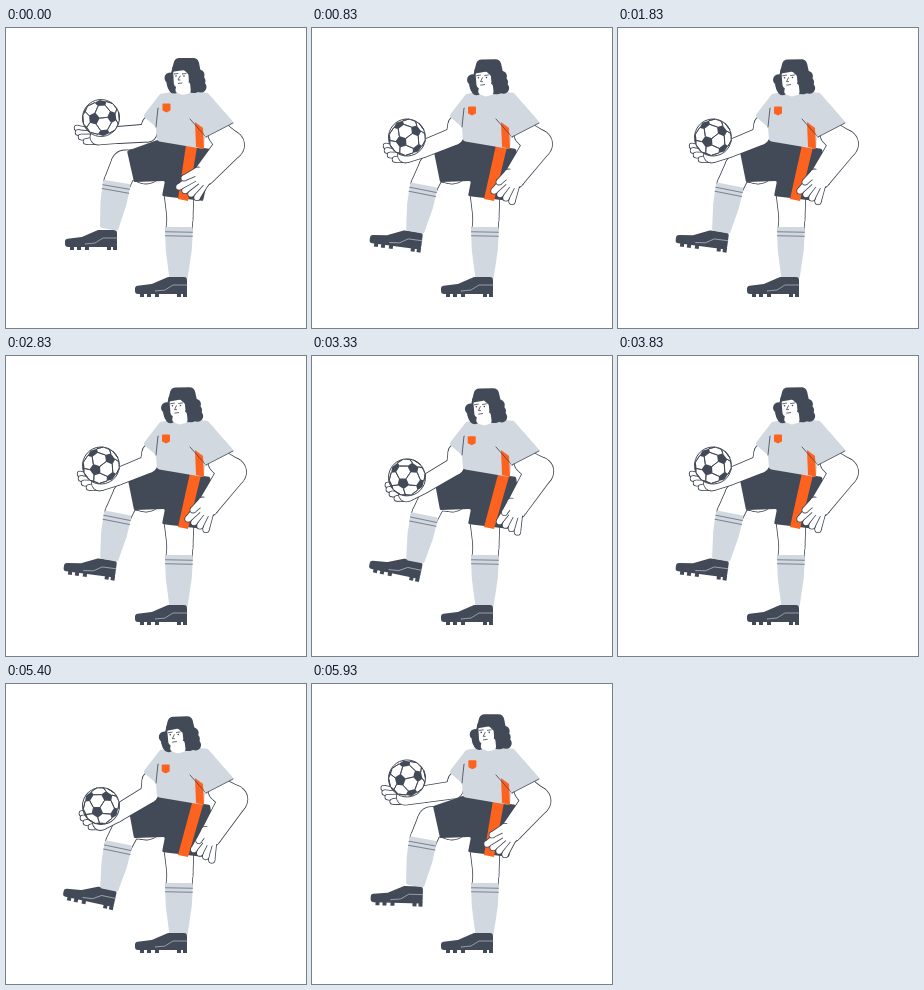
An HTML page with a canvas that plays this animation: 300x300 px, repeating every 6010 ms.

```html
<!DOCTYPE html>
<html lang="en">
<head>
<meta charset="utf-8">
<title>Footballer</title>
<style>
html, body { margin: 0; width: 100%; height: 100%; overflow: hidden; background: #fff; }
canvas { display: block; width: 300px; height: 300px; }
</style>
</head>
<body>
<canvas id="stage" width="300" height="300"></canvas>
<script>
const ctx = document.getElementById('stage').getContext('2d');
const DARK = '#434a57', INK = '#3f4550', SEAM = '#7b8390', GREY = '#d2d8e0', ORANGE = '#fe621f', WHITE = '#fff';
const LOOP = 6010, FRAMES = 120, BEAT = 20;
let sink = 0; // 0 = ball raised, grows as the body sinks

const mix = (a, b) => a + (b - a) * sink;

function disc(x, y, r, fill) {
  ctx.beginPath();
  ctx.arc(x, y, r, 0, 7);
  ctx.fillStyle = fill;
  ctx.fill();
}

function shape(points, fill, radius = 0) {
  const n = points.length, [a, z] = [points[0], points[n - 1]];
  ctx.beginPath();
  ctx.moveTo((a[0] + z[0]) / 2, (a[1] + z[1]) / 2);
  points.forEach((p, i) => ctx.arcTo(...p, ...points[(i + 1) % n], radius));
  ctx.closePath();
  ctx.fillStyle = fill;
  ctx.fill();
}

function line(points, color = INK, width = 0.8) {
  ctx.beginPath();
  points.forEach(p => ctx.lineTo(...p));
  ctx.strokeStyle = color;
  ctx.lineWidth = width;
  ctx.stroke();
}

function placed(x, y, turn, draw) {
  ctx.save();
  ctx.translate(x, y);
  ctx.rotate(turn);
  draw();
  ctx.restore();
}

// Outlined chain of joints [x, y, radius]
function limb(...joints) {
  for (const [grow, fill] of [[0.4, INK], [-0.4, WHITE]]) {
    joints.forEach(([x, y, r], i) => {
      disc(x, y, r + grow, fill);
      if (!i) return;
      const [u, v, s] = joints[i - 1], d = Math.hypot(x - u, y - v);
      const nx = (v - y) / d, ny = (x - u) / d, a = r + grow, b = s + grow;
      shape([[x + nx * a, y + ny * a], [x - nx * a, y - ny * a], [u - nx * b, v - ny * b], [u + nx * b, v + ny * b]], fill);
    });
  }
}

function sock(x, y, length, turn) {
  placed(x, y, turn, () => {
    shape([[-14, 0], [14, 0], [13, length * 0.45], [9, length], [-9, length], [-13, length * 0.45]], GREY, 2);
    for (const drop of [5, 9]) line([[-13.5, drop], [13.5, drop]], SEAM, 1);
  });
}

// Boot with the ankle at the origin, toe to the left
function boot(x, y, turn) {
  placed(x, y, turn, () => {
    for (const stud of [-37, -30, -22, 0, 6]) ctx.fillStyle = DARK, ctx.fillRect(stud, 14, 4, 5);
    shape([[-42, 8], [-25, 6], [-9, -1], [10, -1], [10, 16], [-42, 16]], DARK, 3);
    line([[-22, 13], [-12, 12], [-4, 7], [10, 7]], '#aab2bd');
  });
}

function standingLeg() {
  limb([173, 165, 15], [174, 190, 13], [173, 202, 13]);
  sock(173, 199, 52, 0.01);
  boot(171, 250, 0);
}

function raisedLeg() {
  const x = mix(111, 112), y = mix(155, 158);
  boot(101, mix(203, 204.5), mix(0, 0.13));
  limb([140, 138, 18], [mix(119, 121), mix(136, 139), 14], [x, y, 13.4]);
  sock(x, y - 1, 48, mix(0.17, 0.19));
}

function shorts() {
  shape([[121, mix(123, 119)], [151, 112], [198, 120], [204, 121], [206, 134], [197, 173], [156, 168], [159, 153], [128, 154]], DARK, 1.5);
  const top = mix(180, 184);
  shape([[top, 117], [top + 11, 119], [182, 173], [172, 171]], ORANGE);
}

function ballArm() {
  const dx = mix(0, 3), dy = mix(0, 18);
  for (let i = 0; i < 4; i++) limb([71 + dx + i * i, 100 + dy + 4.5 * i, 2.8], [90 + dx, 105 + dy + 2.5 * i, 4]);
  limb([144, 96, 8], [mix(142, 143), mix(105, 108), 9], [mix(112, 111), mix(107, 121), 8.5], [92 + dx / 2, 109 + dy, 8]);
}

function shirt() {
  shape([[166, 64], [154, 66], [137, 88], [150, 99], [151, 113], [198, 121], [199, 110], [228, 95], [202, 65], [184, 63]], GREY, 3);
  shape([[189, 94], [197, 100], [198, 121], [190, 119]], ORANGE);
  line([[152, 80], [150, 99]]);
  line([[200, 109], [184, 91]]);
  const x = mix(160.5, 160), y = mix(79.5, 82.5);
  shape([[x - 4, y - 4], [x + 4, y - 4], [x + 4, y + 3], [x, y + 5], [x - 4, y + 3]], ORANGE, 1);
}

function hipArm() {
  const dx = mix(0, 9), dy = mix(0, 4), wrist = [mix(198, 202), mix(147, 150)];
  limb([214, 106, 12], [mix(224, 226), mix(117, 116), 14.5], [...wrist, 11]);
  for (let i = 3; i >= 0; i--) limb([173 + dx + 6 * i, 159 + dy + 3.5 * i, 3.2], [190 + dx / 2 + 3 * i, 148 + dy / 2 + 2 * i, 4.5]);
  disc(...wrist, 10.2, WHITE);
  limb([178 + dx, 150 + dy, 3], [192 + dx / 2, 143 + dy / 2, 4]);
  disc(196 + dx / 2, 146 + dy / 2, 7, WHITE);
  // Sleeve edge lies over the arm
  shape([[199, 109], [228, 95], [210, 75], [196, 90]], GREY, 1);
  line([[200, 109], [227, 95]]);
}

function head() {
  placed(mix(179, 175.5), mix(49, 50.5), mix(0, -0.02), () => {
    shape([[-10, -19], [13, -19], [16, -4], [22, 12], [10, 16], [-20, 14], [-14, -4]], DARK, 6);
    for (let i = 0; i < 3; i++) disc(-15 + 2 * i, 1 + 5 * i, 5.5, DARK), disc(14 + i, -2 + 6 * i, 5.5, DARK);
    shape([[-8, 5], [5, 5], [6, 16], [-2, 18], [-10, 15]], WHITE, 3);
    shape([[-12, -8], [3, -8], [4, 5], [-3, 12], [-11, 9]], WHITE, 4);
    shape([[-13, -10], [4, -12], [8, 0], [3, -3], [-1, -7], [-13, -5]], DARK, 2);
    for (const x of [-9, -1]) disc(x, -1, 0.8, INK), line([[x - 2, -3], [x + 2, -3.5]]);
    line([[-5, -1], [-7, 3], [-5, 3]]);
    line([[-7, 6.5], [-3, 6]]);
  });
}

// Corners of an icosahedron, turned so that two of them face the viewer
const PHI = (1 + Math.sqrt(5)) / 2, YAW = 0.14;
const corners = [];
for (const a of [-1, 1]) for (const b of [-PHI, PHI]) corners.push([a, 0, b], [0, b, a], [b, a, 0]);
const ballCorners = corners.map(([x, y, z]) =>
  [x * Math.cos(YAW) + z * Math.sin(YAW), y, z * Math.cos(YAW) - x * Math.sin(YAW)]);

function ball() {
  const R = 18.5;
  const near = (p, o) => p !== o && Math.hypot(...p.map((v, i) => v - o[i])) < 2.1;
  const between = (p, o, k) => p.map((v, i) => v + (o[i] - v) * k);
  const flat = ([x, y, z]) => {
    const d = z < 0 ? Math.hypot(x, y) : Math.hypot(x, y, z);
    return [R * x / d, R * y / d];
  };
  placed(95, mix(90, 109.5), mix(-0.1, -0.65), () => {
    disc(0, 0, R, WHITE);
    for (const p of ballCorners) {
      if (p[2] < -0.5) continue;
      const around = ballCorners.filter(o => near(p, o));
      for (const o of around) if (o[2] > -0.5) line([flat(between(p, o, 0.33)), flat(between(p, o, 0.67))]);
      const ring = around.map(o => flat(between(p, o, 0.33)));
      const cx = ring.reduce((s, c) => s + c[0], 0) / 5, cy = ring.reduce((s, c) => s + c[1], 0) / 5;
      const angle = c => Math.atan2(c[1] - cy, c[0] - cx);
      shape(ring.sort((a, b) => angle(a) - angle(b)), DARK);
    }
    ctx.beginPath();
    ctx.arc(0, 0, R, 0, 7);
    ctx.lineWidth = 0.9;
    ctx.strokeStyle = INK;
    ctx.stroke();
  });
}

// Short lift once per second, with a slow sway around the low point
const lift = step => Math.cos((step - 0.5) / BEAT * Math.PI) ** 6;

function draw(now) {
  const t = now % LOOP;
  // Two pictures per 100 ms, held 30 and 70 ms
  const step = Math.min(FRAMES - 1, Math.floor(t / 100) * 2 + (t % 100 >= 30 ? 1 : 0));
  sink = (lift(0) - lift(step)) / (lift(0) - lift(17));
  ctx.fillStyle = WHITE;
  ctx.fillRect(0, 0, 300, 300);
  ctx.lineJoin = ctx.lineCap = 'round';
  raisedLeg();
  standingLeg();
  shorts();
  ballArm();
  shirt();
  hipArm();
  head();
  ball();
}

const start = performance.now();
function tick() {
  draw(performance.now() - start);
  requestAnimationFrame(tick);
}
tick();
</script>
</body>
</html>
```
